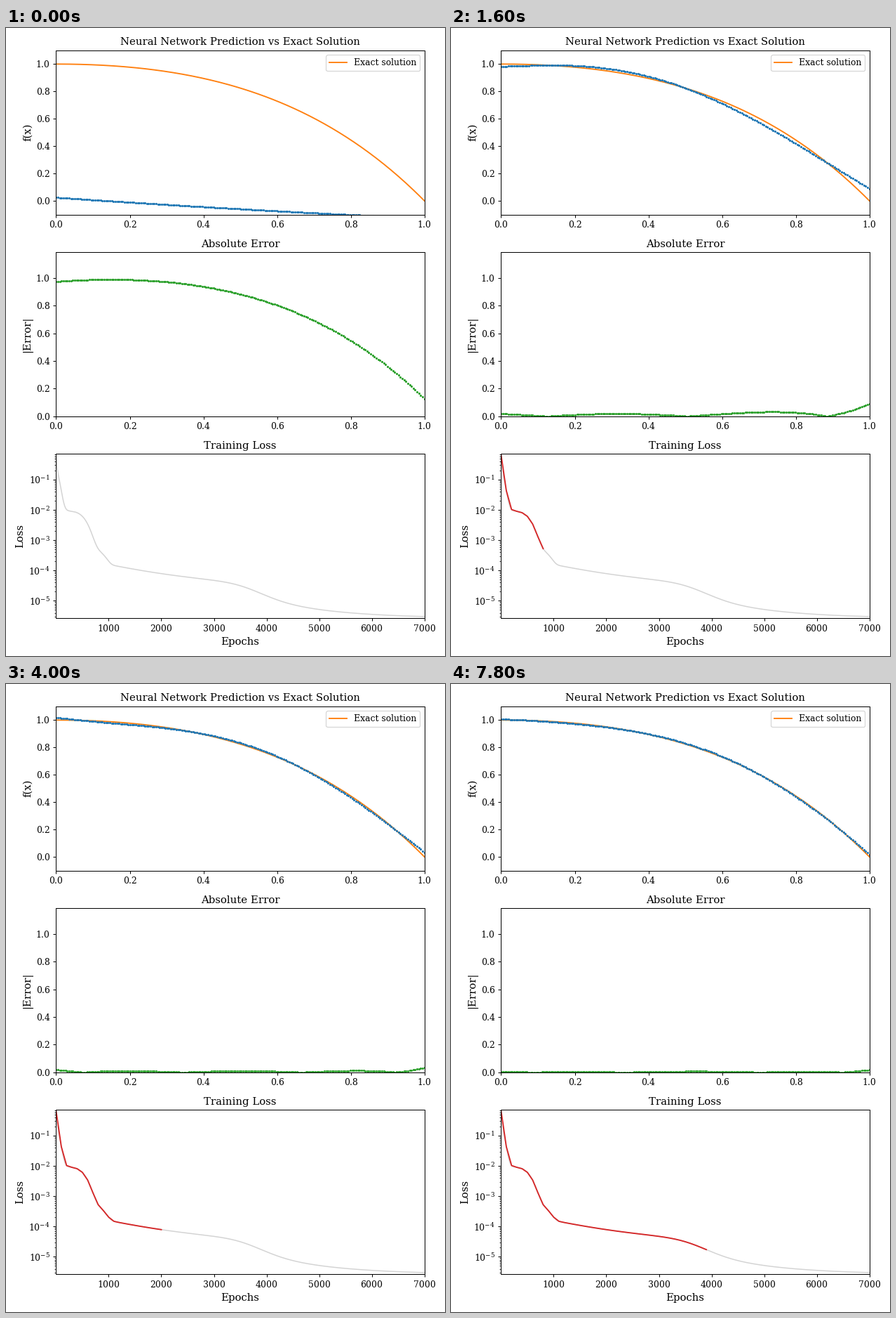
Write a matplotlib script that moves like this. It is 626 px wide and 894 px high and loops after 8000 ms.

```python
import numpy as np
import matplotlib.pyplot as plt
from matplotlib.animation import FuncAnimation

W, H, DPI = 626, 894, 89.45
FRAMES, INTERVAL, STEP = 40, 200, 100

plt.rcParams["font.family"] = "DejaVu Serif"

x = np.linspace(0, 1, 200)
exact = (1 - x) * np.exp(x)


def residual(roots, start, mid, end):
    """Error curve with given roots, scaled by a parabola through three gains."""
    curve = 2 * (start - 2 * mid + end)
    gain = start + (end - start - curve) * x + curve * x**2
    return gain * np.prod([x - r for r in roots], axis=0)


def ease_in(t):
    return t**2


def ease_out(power):
    return lambda t: 1 - (1 - t)**power


def linear(t):
    return t


# Stages of the fit: frame, error curve, easing towards the next stage
STAGES = [
    (0, 0.025 - 0.185 * x + 0.033 * x**2 - exact, ease_out(4)),
    (3, residual([0.24, 0.81], 0.84, 1.22, 1.73), ease_in),
    (8, residual([0.125, 0.505, 0.885], 0.32, 1.2, 1.8), ease_out(1.3)),
    (12, residual([0.07, 0.32, 0.635, 0.91], 1.55, 2.2, 2.07), linear),
    (20, residual([0.075, 0.345, 0.665, 0.92], 1.2, 2.0, 2.03), linear),
    (39, residual([0.09, 0.335, 0.705, 0.924], 0.3, 1.05, 1.3), linear),
]


def error_at(n):
    for (n0, e0, ease), (n1, e1, _) in zip(STAGES, STAGES[1:]):
        if n <= n1:
            return e0 + ease((n - n0) / (n1 - n0)) * (e1 - e0)


def loss_at(e):
    """Training loss as a sum of plateaus, each falling off in turn."""
    start = 0.41 * np.exp(-e / 8) + 10**(-0.55 - 0.0062 * e - 3e-5 * e**2)
    first = 10**(-2.06 - 0.37 * (e / 570)**5)
    second = 10**(-3.5 - 0.85 * (e / 1000)**10)
    third = 3e-5 / (1 + np.exp((e - 3620) / 260))
    tail = 2.7e-6 + 2.3e-6 * np.exp(5 - e / 1000)
    return start + first + second + third + tail


fig, (ax_fit, ax_err, ax_loss) = plt.subplots(
    3, 1, figsize=(W / DPI + 1e-6, H / DPI + 1e-6), dpi=DPI, facecolor="white")


def label(ax, title, ylabel, xlim, ylim):
    ax.set_title(title)
    ax.set_ylabel(ylabel, fontsize=12)
    ax.set_xlim(*xlim)
    ax.set_ylim(*ylim)


def dots(ax, color):
    return ax.plot(x, x, ".", ms=3, color=color)[0]


ax_fit.plot(x, exact, color="tab:orange", label="Exact solution")
ax_fit.legend(loc="upper right")
fit = dots(ax_fit, "tab:blue")
err = dots(ax_err, "tab:green")

epochs = np.arange(1.0, 7001)
ax_loss.plot(epochs, loss_at(epochs), color="lightgray", lw=1.2)
trace, = ax_loss.plot([], [], color="tab:red", lw=1.5)
ax_loss.set_yscale("log")
ax_loss.set_xlabel("Epochs", fontsize=12)

label(ax_fit, "Neural Network Prediction vs Exact Solution", "f(x)", (0, 1), (-0.1, 1.1))
label(ax_err, "Absolute Error", "|Error|", (0, 1), (0, 1.2 * np.abs(STAGES[0][1]).max()))
label(ax_loss, "Training Loss", "Loss", (1, 7000), (10**-5.57, 10**-0.147))
fig.tight_layout()

samples = np.maximum(1.0, STEP * np.arange(FRAMES))
losses = loss_at(samples)


def draw(n):
    e = error_at(n)
    fit.set_ydata(exact + e)
    err.set_ydata(np.abs(e))
    trace.set_data(samples[:n + 1], losses[:n + 1])
    return fit, err, trace


anim = FuncAnimation(fig, draw, frames=FRAMES, interval=INTERVAL, repeat=True,
                     repeat_delay=0, blit=False)
plt.show()
```
